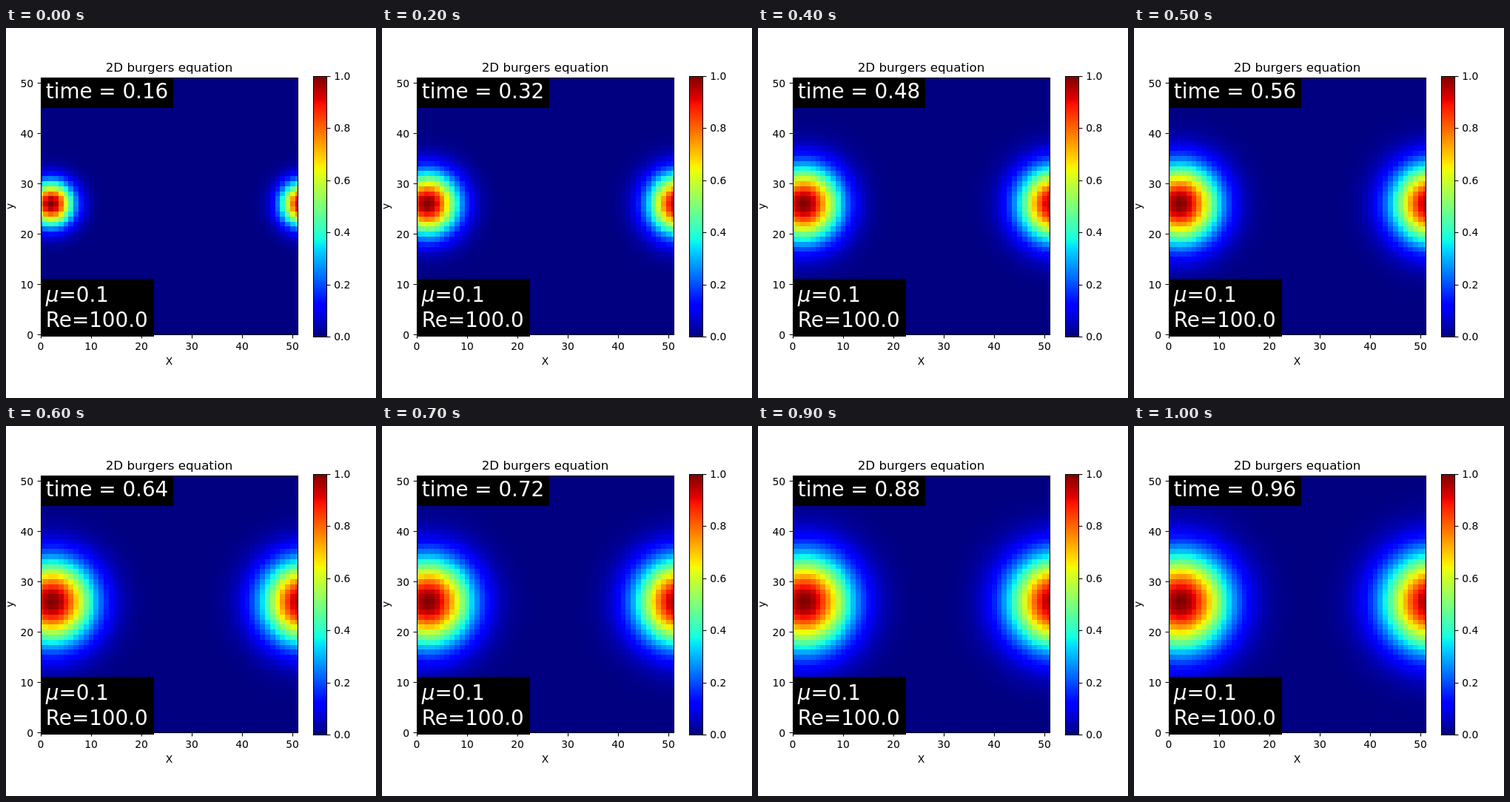
These frames come from a looping animation (500x500 px, 1100 ms). An HTML page with a canvas:

```html
<!DOCTYPE html>
<html lang="en">
<head>
<meta charset="utf-8">
<title>Diffusing pulse</title>
<style>
html, body { margin: 0; width: 100%; height: 100%; overflow: hidden; background: #fff; }
canvas, svg { position: absolute; left: 0; top: 0; width: 500px; height: 500px; }
text { font-family: "DejaVu Sans", Verdana, sans-serif; font-size: 13.89px; }
.title { font-size: 16.67px; }
.note { font-size: 27.78px; fill: #fff; }
.lines { fill: none; stroke: #000; stroke-width: 1.1; }
</style>
</head>
<body>
<canvas id="field" width="500" height="500"></canvas>
<svg viewBox="0 0 500 500">
  <g id="axes" class="lines">
    <rect x="47.5" y="67.5" width="347" height="347"/>
    <rect x="415.5" y="65.5" width="18" height="352"/>
  </g>
  <g id="labels">
    <text class="title" x="220.5" y="59" text-anchor="middle">2D burgers equation</text>
    <text x="220.5" y="455" text-anchor="middle">X</text>
    <text transform="translate(10 241) rotate(-90)" text-anchor="middle">y</text>
  </g>
  <rect id="clockBox" x="47" y="67" height="41"/>
  <text id="clock" class="note" x="53.8" y="95"></text>
  <rect x="47" y="339" width="153" height="78"/>
  <text class="note" x="53.8" y="369.5"><tspan font-style="italic">μ</tspan>=0.1</text>
  <text class="note" x="53.8" y="404">Re=100.0</text>
</svg>
<script>
const LOOP = 1100, STEP = 100;
const LEFT = 46.95, BOTTOM = 414.7, UNIT = 6.808, LAST = 51, PERIOD = 50;
const byId = id => document.getElementById(id);
const ctx = byId('field').getContext('2d');

function add(parent, tag, attrs, content = '') {
  const node = document.createElementNS('http://www.w3.org/2000/svg', tag);
  for (const key in attrs) node.setAttribute(key, attrs[key]);
  node.textContent = content;
  byId(parent).append(node);
}

const clamp = (v, lo, hi) => Math.min(hi, Math.max(lo, v));
const ramp = (v, from, to) => clamp((v - from) / (to - from), 0, 1);

function jet(v) {
  const r = ramp(v, 0.35, 0.66) - 0.5 * ramp(v, 0.89, 1);
  const g = ramp(v, 0.125, 0.375) - ramp(v, 0.64, 0.91);
  const b = 0.5 + 0.5 * ramp(v, 0, 0.11) - ramp(v, 0.34, 0.65);
  const blue = v > 0.34 ? 1 - ramp(v, 0.34, 0.65) : b;
  return `rgb(${[r, g, blue].map(c => Math.round(c * 255)).join()})`;
}

const pixelX = x => Math.round(LEFT + UNIT * clamp(x, 0, LAST));
const pixelY = y => Math.round(BOTTOM - UNIT * clamp(y, 0, LAST));

function drawAxes() {
  for (let v = 0; v <= 50; v += 10) {
    const x = Math.round(LEFT + UNIT * v) + 0.5;
    const y = Math.floor(BOTTOM - UNIT * v) + 0.5;
    add('axes', 'path', { d: `M${x} 414.5v5M47.5 ${y}h-5` });
    add('labels', 'text', { x: x - 0.5, y: 435, 'text-anchor': 'middle' }, v);
    add('labels', 'text', { x: 37.2, y: y + 5, 'text-anchor': 'end' }, v);
  }
  for (let i = 0; i <= 5; i++) {
    const y = Math.round(417 - 70.4 * i) + 0.5;
    add('axes', 'path', { d: `M433.5 ${y}h5` });
    add('labels', 'text', { x: 443.3, y: y + 4.7 }, (i / 5).toFixed(1));
  }
  for (let y = 65; y < 418; y++) {
    ctx.fillStyle = jet((417 - y) / 352);
    ctx.fillRect(415, y, 19, 1);
  }
}

// A spreading Gaussian, periodic in x, sampled on integer grid points.
function drawField(time) {
  const spread = 2 * (59 * time - 14 * time * time);
  const centre = 2.05 + 0.3 * time;
  for (let i = 0; i <= LAST; i++) {
    const x = pixelX(i - 0.5), width = pixelX(i + 0.5) - x;
    const offset = i - centre;
    const dx = offset - PERIOD * Math.round(offset / PERIOD);
    for (let j = 0; j <= LAST; j++) {
      const y = pixelY(j + 0.5), dy = j - 26;
      ctx.fillStyle = jet(Math.exp(-(dx * dx + dy * dy) / spread));
      ctx.fillRect(x, y, width, pixelY(j - 0.5) - y);
    }
  }
}

let shown = -1;
function render(ms) {
  const step = Math.floor((ms % LOOP) / STEP);
  if (step === shown) return;
  shown = step;
  const time = (16 + 8 * step) / 100;
  const label = `time = ${time}`;
  drawField(time);
  byId('clock').textContent = label;
  byId('clockBox').setAttribute('width', 179 - 17.7 * (11 - label.length));
}

drawAxes();
const start = performance.now();
function tick() {
  render(performance.now() - start);
  requestAnimationFrame(tick);
}
tick();
</script>
</body>
</html>
```
